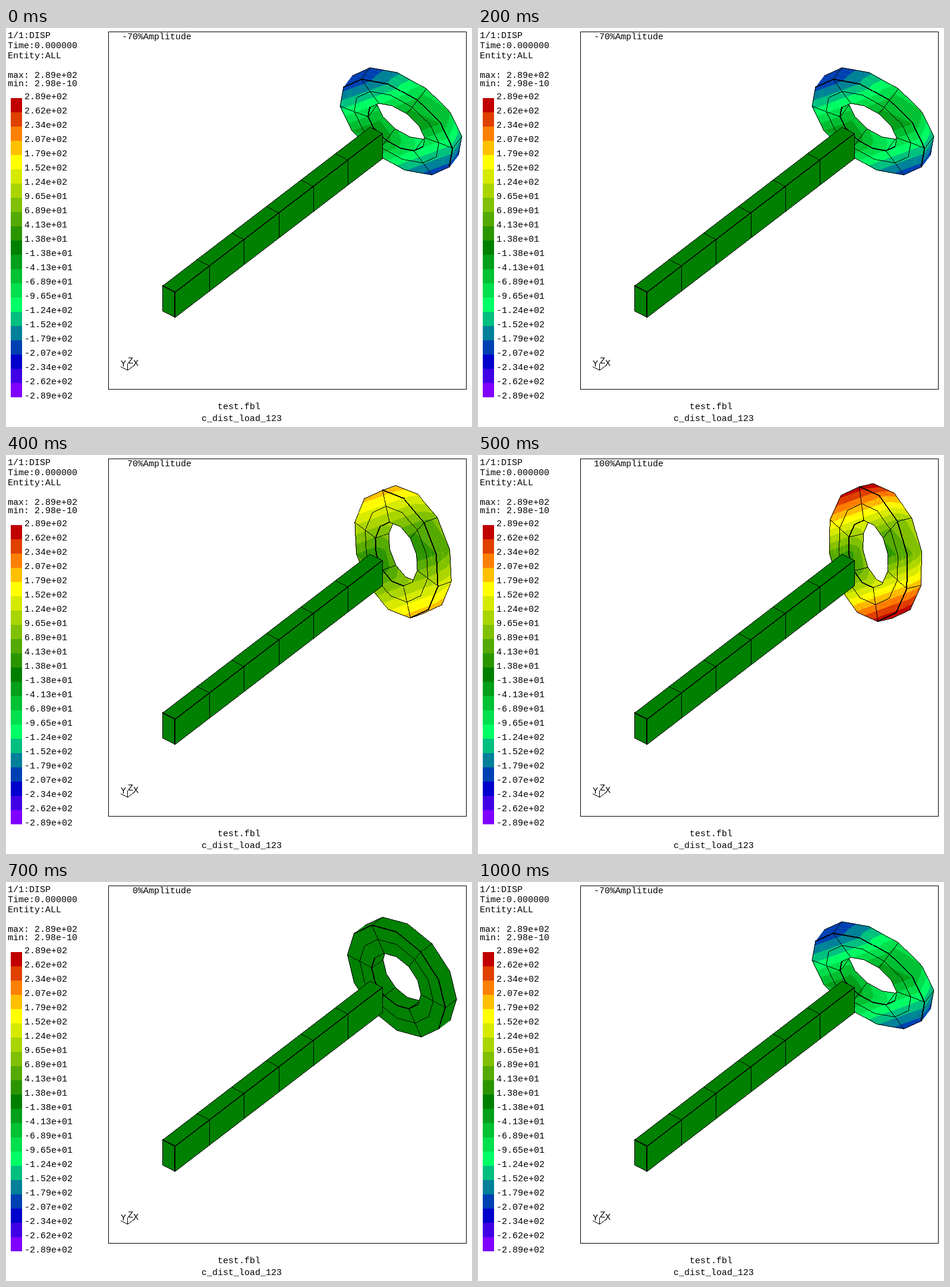
Write an HTML page with a canvas that moves like this. It is 784 px wide and 672 px high and loops after 1.1 s.

```html
<!DOCTYPE html>
<html lang="en">
<head>
<meta charset="utf-8">
<title>Displacement animation</title>
<style>
html, body { margin: 0; width: 784px; height: 672px; overflow: hidden; background: #fff; }
canvas { display: block; }
</style>
</head>
<body>
<canvas id="stage" width="784" height="672"></canvas>
<script>
const ctx = document.getElementById('stage').getContext('2d');
const STEP = 100, STEPS = 11, BANDS = 21, MAX = 289.4;

// Colour scale: stops by band index, blended linearly between them.
const STOPS = [
  [0, 192, 0, 0], [2, 255, 128, 0], [4, 255, 255, 0], [10, 0, 128, 0],
  [14, 0, 255, 102], [18, 0, 0, 204], [20, 128, 0, 255]
];
function bandColor(i) {
  const n = Math.max(1, STOPS.findIndex(s => s[0] >= i));
  const a = STOPS[n - 1], b = STOPS[n];
  const f = (i - a[0]) / (b[0] - a[0]);
  return `rgb(${[1, 2, 3].map(c => Math.round(a[c] + (b[c] - a[c]) * f))})`;
}
const COLORS = Array.from({ length: BANDS }, (_, i) => bandColor(i));
const GREEN = COLORS[10];

// Ring: centre, two in-plane axes, thickness, and displacement at 70 %.
const C = [656.5, 166.6], U = [82.5, 44.6], V = [0.4, 82.7], W = [18.5, -14];
const TILT = [-18.5, 14], SHIFT = [3.6, 5.9];
const TILT_DIR = 48 * Math.PI / 180, DEPTH = 0.264;

function text(str, x, y, align = 'left', size = 15) {
  ctx.font = `${size}px "Liberation Mono", "Courier New", monospace`;
  ctx.textAlign = align;
  ctx.fillStyle = '#000';
  ctx.fillText(str, x, y);
}

// Hard-edged pixel line.
function line(x1, y1, x2, y2, w = 1) {
  const dx = x2 - x1, dy = y2 - y1;
  const n = Math.max(1, Math.round(Math.max(Math.abs(dx), Math.abs(dy))));
  const flat = Math.abs(dx) >= Math.abs(dy);
  const o = w > 1 ? 1 : 0;
  ctx.fillStyle = '#000';
  for (let i = 0; i <= n; i++) {
    const x = Math.round(x1 + dx * i / n), y = Math.round(y1 + dy * i / n);
    if (flat) ctx.fillRect(x, y - o, 1, w);
    else ctx.fillRect(x - o, y, w, 1);
  }
}

function fillPoly(pts, color) {
  ctx.beginPath();
  pts.forEach(p => ctx.lineTo(p.x + 0.5, p.y + 0.5));
  ctx.closePath();
  ctx.fillStyle = ctx.strokeStyle = color;
  ctx.lineWidth = 0.7;
  ctx.fill();
  ctx.stroke();
}

// Keep the part of a polygon whose band position is at least lim.
function clipAbove(pts, lim) {
  const out = [];
  pts.forEach((a, i) => {
    const b = pts[(i + 1) % pts.length];
    if (a.s >= lim) out.push(a);
    if ((a.s >= lim) !== (b.s >= lim)) {
      const f = (lim - a.s) / (b.s - a.s);
      out.push({ x: a.x + (b.x - a.x) * f, y: a.y + (b.y - a.y) * f, s: lim });
    }
  });
  return out;
}

function fillBands(tri) {
  const all = tri.map(p => p.s);
  const band = s => Math.max(0, Math.min(BANDS - 1, Math.floor(s)));
  const lo = band(Math.min(...all)), hi = band(Math.max(...all));
  fillPoly(tri, COLORS[lo]);
  for (let b = lo + 1; b <= hi; b++) {
    const part = clipAbove(tri, b);
    if (part.length > 2) fillPoly(part, COLORS[b]);
  }
}

// Ring node: k in twelfths of a turn, r relative radius, d depth.
function node(k, r, d, amp) {
  const th = k * Math.PI / 6, c = Math.cos(th), s = Math.sin(th);
  const out = r * Math.cos(th - TILT_DIR), a = amp / 0.7;
  const at = i => C[i] + r * (U[i] * c + V[i] * s) + d * W[i]
    + a * (out * TILT[i] + d * SHIFT[i]);
  const value = amp * MAX * Math.hypot(out, DEPTH * d) / 1.014;
  return { x: at(0), y: at(1), s: (MAX - value) * BANDS / (2 * MAX) };
}

const LOOP = [[0, 0], [.5, 0], [1, 0], [1, .5], [1, 1], [.5, 1], [0, 1], [0, .5]];

// Eight-node face split into a fan of triangles about its centre.
function fan(place) {
  const pts = LOOP.map(([s, t]) => place(s, t));
  const mid = {};
  for (const key of ['x', 'y', 's']) {
    mid[key] = pts.reduce((sum, p, i) => sum + p[key] * (i % 2 ? 0.5 : -0.25), 0);
  }
  return pts.map((p, i) => ({ tri: [mid, p, pts[(i + 1) % 8]], side: i }));
}

function cross([a, b, c]) {
  return (b.x - a.x) * (c.y - a.y) - (b.y - a.y) * (c.x - a.x);
}

function edge([, a, b], w) {
  line(a.x, a.y, b.x, b.y, w);
}

function paint(parts) {
  parts.forEach(p => fillBands(p.tri));
  parts.forEach(p => edge(p.tri));
}

function wall(r, sign, amp) {
  const parts = [];
  for (let k = 0; k < 12; k += 2) {
    parts.push(...fan((s, t) => node(k + 2 * s, r, t, amp)));
  }
  return parts.filter(p => cross(p.tri) * sign > 0);
}

function drawRing(amp) {
  const inner = wall(0.5, 1, amp), outer = wall(1, -1, amp), front = [];
  for (let k = 0; k < 12; k += 2) {
    for (const r of [0.5, 0.75]) {
      front.push(...fan((s, t) => node(k + 2 * s, r + t / 4, 0, amp)));
    }
  }
  paint(inner);
  paint(outer);
  paint(front);
  // Front rims next to a visible wall are heavier.
  [...inner, ...outer].filter(p => p.side < 2).forEach(p => edge(p.tri, 2));
}

function drawBeam() {
  const L = [349, -267.5];
  const a = [263, 434], b = [284, 445], c = [284, 487], d = [263, 476];
  const far = (p, f = 1) => [p[0] + L[0] * f, p[1] + L[1] * f];
  const seg = (p, q, w) => line(...p, ...q, w);
  fillPoly([a, far(a), far(b), far(c), c, d].map(([x, y]) => ({ x, y })), GREEN);
  for (let i = 1; i <= 6; i++) {
    seg(far(a, i / 6), far(b, i / 6));
    seg(far(b, i / 6), far(c, i / 6));
  }
  seg(a, far(a));
  seg(c, far(c));
  seg(a, d);
  seg(d, c);
  seg(a, b, 2);
  seg(b, c, 2);
  seg(b, far(b), 2);
}

function sci(v) {
  return v.toExponential(2).replace(/([+-])(\d)$/, '$10$2');
}

function drawPanel() {
  text('1/1:DISP', 3, 17);
  text('Time:0.000000', 3, 34);
  text('Entity:ALL', 3, 51);
  text('max: 2.89e+02', 3, 84);
  text('min: 2.98e-10', 3, 98);
  COLORS.forEach((color, i) => {
    ctx.fillStyle = color;
    ctx.fillRect(8, 118 + 24 * i, 19, 24);
  });
  for (let i = 0; i <= BANDS; i++) {
    text(sci(MAX * (1 - 2 * i / BANDS)), 31, 120 + 24 * i);
  }
  ctx.strokeStyle = '#000';
  ctx.lineWidth = 1;
  ctx.strokeRect(172.5, 6.5, 602, 602);
  text('test.fbl', 356, 642);
  text('c_dist_load_123', 329, 662);
}

function drawAxes() {
  line(204, 576, 193, 570);
  line(204, 576, 204, 565);
  line(204, 576, 215, 568);
  text('Y', 193, 570);
  text('Z', 205, 565);
  text('X', 214, 569);
}

function draw(step) {
  const percent = Math.trunc(100 * Math.sin((step - 3) * Math.PI / 4));
  ctx.fillStyle = '#fff';
  ctx.fillRect(0, 0, 784, 672);
  drawPanel();
  drawAxes();
  text(`${percent}%Amplitude`, 312, 19, 'right');
  drawRing(percent / 100);
  drawBeam();
}

let shown = -1;
const start = performance.now();
function tick() {
  const step = Math.floor((performance.now() - start) / STEP) % STEPS;
  if (step !== shown) draw(shown = step);
  requestAnimationFrame(tick);
}
tick();
</script>
</body>
</html>
```
